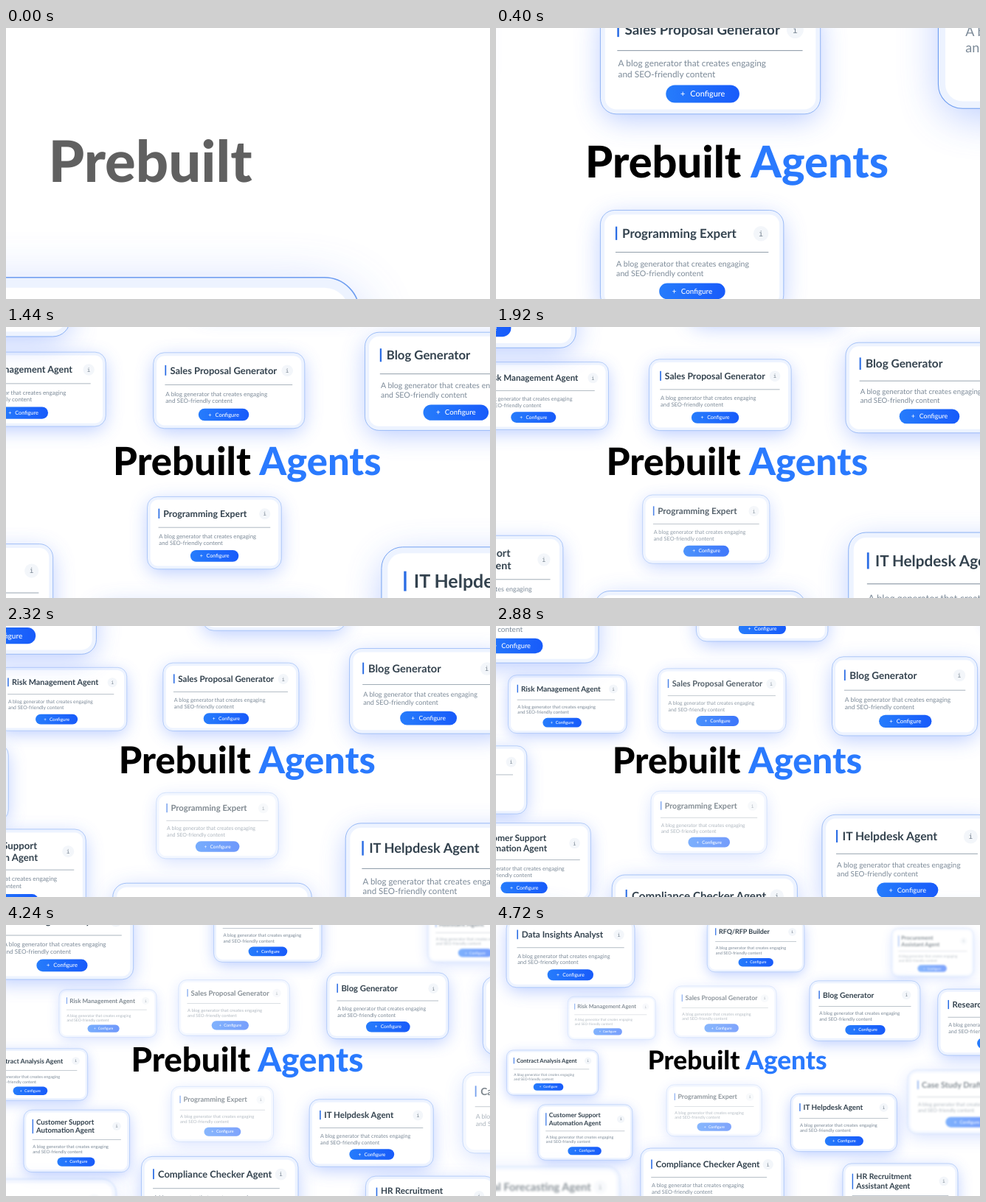
Write an HTML page that moves like this. It is 656x368 px and loops after 4.8 s.

```html
<!DOCTYPE html>
<html lang="en">
<head>
<meta charset="utf-8">
<title>Prebuilt Agents</title>
<style>
  html, body { margin: 0; width: 100%; height: 100%; overflow: hidden; background: #fff; }
  svg { display: block; width: 656px; height: 368px; font-family: Lato, sans-serif; text-rendering: geometricPrecision; }
  .head { font-size: 14.85px; font-weight: 700; fill: #33424e; }
  .body { font-size: 9.35px; fill: #7c8a98; }
  .btn { font-size: 8.6px; font-weight: 500; fill: #fff; }
  .info { font: 9px "DejaVu Sans Mono", monospace; fill: #75828f; text-anchor: middle; }
  #title { font-size: 55px; font-weight: 800; }
</style>
</head>
<body>
<svg viewBox="0 0 656 368">
  <defs>
    <linearGradient id="blue">
      <stop offset="0" stop-color="#267cfc"/>
      <stop offset="1" stop-color="#185bfa"/>
    </linearGradient>
    <filter id="glow" x="-40%" y="-60%" width="180%" height="220%">
      <feGaussianBlur stdDeviation="15"/>
    </filter>
  </defs>
  <g id="cards"></g>
  <g id="title">
    <text id="word1" x="4" y="18" text-anchor="end">Prebuilt</text>
    <text id="word2" x="16" y="18" fill="#2a7afe">Agents</text>
  </g>
</svg>
<script>
const LOOP = 4800, STEP = 80, CX = 328, CY = 184;
const $ = id => document.getElementById(id);
const clamp = v => Math.max(0, Math.min(1, v));

// title, centre in card widths from the vanishing point, design width,
// 1/width = (near + rate * depth) / 100000, depth where it leaves focus, blur
const specs = [
  ['Procurement|Assistant Agent', 2.374, -1.321, 221, 195, 705, .5, 1.5],
  ['Risk Management Agent', -1.44, -.485, 240, 393, 448, .66, 1.1],
  ['Programming Expert', -.251, .526, 218, 490, 285, .27, .7],
  ['Sales Proposal Generator', -.1255, -.4763, 235, 425.5, 293.9, .47, .8],
  ['Contract Analysis Agent', -2.024, .133, 240, 245, 560],
  ['RFQ/RFP Builder', .183, -1.185, 218, 350, 410],
  ['Customer Support|Automation Agent', -1.618, .762, 221, 327, 454],
  ['IT Helpdesk Agent', .995, .586, 217, 161, 533],
  ['Blog Generator', 1.147, -.45, 217, 339, 328],
  ['HR Recruitment|Assistant Agent', 1.41, 1.191, 221, 263, 378],
  ['Research Agent', 2.13, -.313, 218, 117, 485],
  ['Data Insights Analyst', -1.305, -.84, 219, 269, 306],
  ['Case Study Drafter', 1.9375, .351, 218, -81, 706, .7, 1.8],
  ['Compliance Checker Agent', -.18, .854, 245, 275, 240],
  ['Financial Forecasting Agent', -1.153, .827, 247, 178, 230, .6, 2.2]
];

const rect = (x, y, w, h, r, extra) =>
  `<rect x="${x}" y="${y}" width="${w}" height="${h}" rx="${r}" ${extra}/>`;
const text = (cls, x, y, s) => `<text class="${cls}" x="${x}" y="${y}">${s}</text>`;

// a second title line pushes everything under it down by dy
function cardMarkup(lines, w, h, dy) {
  const head = lines.map((s, i) => text('head', 26, (dy ? 30 : 33) + i * 18.2, s)).join('');
  return rect(2, 9, w - 4, h - 4, 17, 'fill="#5b86ff" opacity=".44" filter="url(#glow)"') +
    rect(0, 0, w, h, 17, 'fill="#edf3ff" stroke="#6c9cf0" stroke-width=".55"') +
    rect(5, 5, w - 10, h - 10, 12, 'fill="#fff"') +
    rect(18, 19.5, 2, 16 + dy * 1.15, 0, 'fill="#2b6de4"') + head +
    `<circle cx="${w - 27}" cy="${28 + dy / 2}" r="9" fill="#f3f6fa"/>` +
    text('info', w - 27, 31.2 + dy / 2, 'i') +
    `<g transform="translate(0 ${dy})">` +
    rect(18, 49.6, Math.min(w - 18, 216) - 18, .9, 0, 'fill="#94a1ad"') +
    text('body', 19, 67.3, 'A blog generator that creates engaging') +
    text('body', 19, 78.5, 'and SEO-friendly content') +
    rect(70, 87, 78.5, 19, 9.5, 'fill="url(#blue)"') +
    text('btn', 85.5, 99.4, '+') + text('btn', 96, 99.4, 'Configure') + '</g>';
}

const cards = specs.map(([title, x, y, w, near, rate, focus, blur]) => {
  const lines = title.split('|'), dy = lines.length > 1 ? 12 : 0, h = 118 + dy;
  const el = document.createElementNS('http://www.w3.org/2000/svg', 'g');
  el.innerHTML = cardMarkup(lines, w, h, dy);
  $('cards').append(el);
  return { el, x, y, w, h, near, rate, focus, blur };
});

function place(card, depth) {
  const inv = (card.near + card.rate * depth) / 1e5;
  const wide = 1 / inv, s = wide / card.w, tall = card.h * s;
  const x = CX + (card.x - .5) * wide, y = CY + card.y * wide - tall / 2, m = 45;
  const seen = inv > 5e-4 && x < 656 + m && x + wide > -m && y < 368 + m && y + tall > -m;
  card.el.style.display = seen ? '' : 'none';
  if (!seen) return;
  card.el.setAttribute('transform', `translate(${x} ${y}) scale(${s})`);
  if (card.focus === undefined) return;
  const d = depth - card.focus;
  const soft = card.blur * clamp(.35 * clamp(d / .08) + Math.max(0, d) * .8);
  card.el.style.opacity = 1 - .35 * clamp(d / .1) - .1 * clamp(d / .5);
  card.el.style.filter = soft > 0 ? `blur(${soft / s}px)` : 'none';
}

function draw(ms) {
  const t = ms / 1000, rush = (from) => clamp((t - from) / (4.72 - from)) ** 3;
  const depth = .4015 + .2 * (t - 2.32) - 1.078 * Math.exp(-t / .333) + .1185 * rush(3.44);
  cards.forEach(c => place(c, depth));
  const wide = 348 - 17.1 * (t - 2.32) + 150 * Math.exp(-t / .25) - 64 * rush(4.24);
  $('title').setAttribute('transform', `translate(${CX} ${CY}) scale(${wide / 380})`);
  $('word1').setAttribute('opacity', clamp(.62 + t * 2.4));
  $('word2').setAttribute('opacity', clamp((t - .04) / .28));
}

const start = performance.now();
function tick() {
  const ms = (performance.now() - start) % LOOP;
  draw(Math.floor(ms / STEP) * STEP);
  requestAnimationFrame(tick);
}
tick();
</script>
</body>
</html>
```
